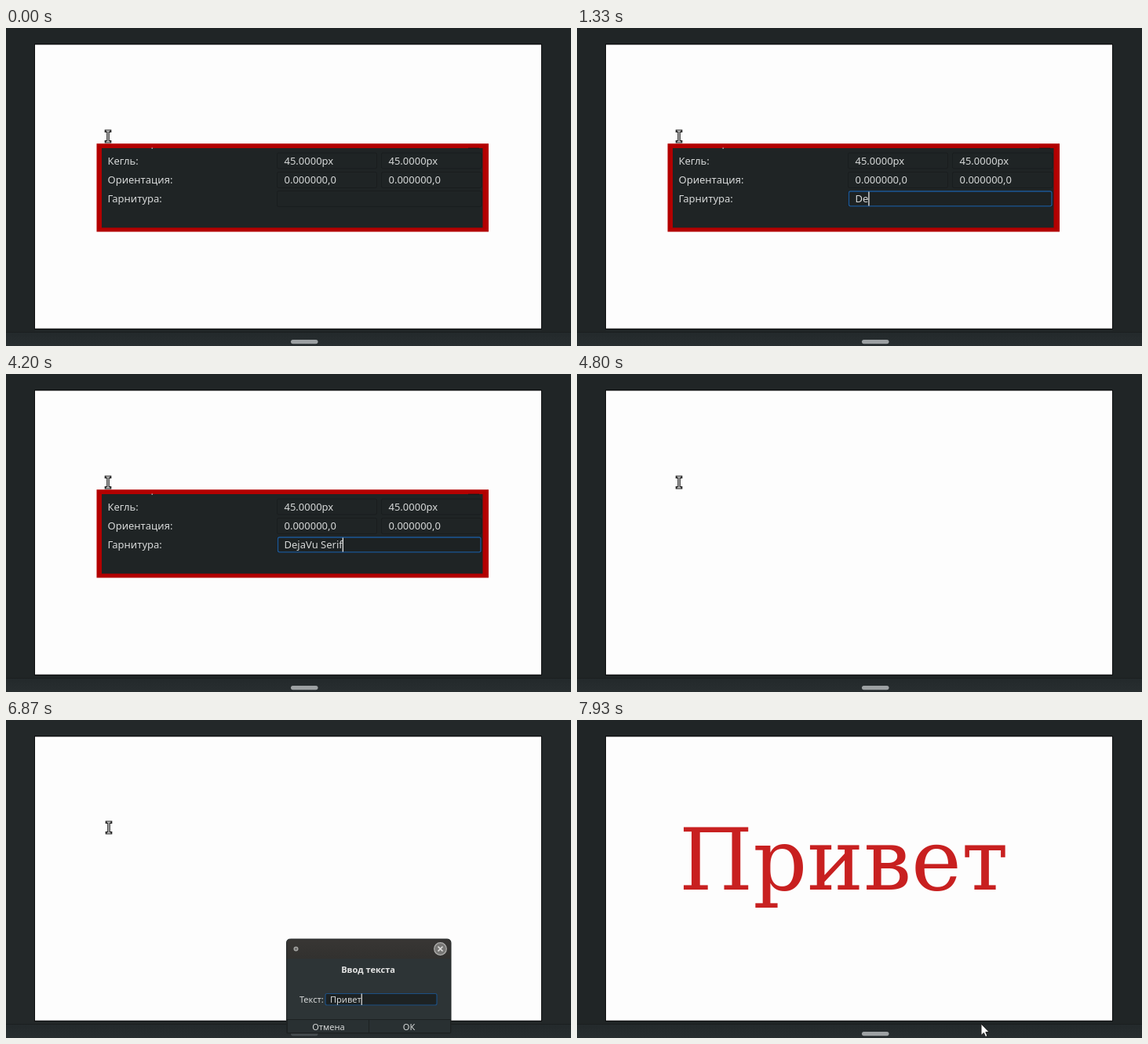
Recreate the animation shown at these times as an HTML page. Size 720x405 px, loop 8 s.

```html
<!DOCTYPE html>
<html lang="ru">
<head>
<meta charset="utf-8">
<style>
html, body { margin: 0; height: 100%; overflow: hidden; background: #202526; }
svg { display: block; width: 720px; height: 405px; }
text { font: 13px "Noto Sans", "Open Sans", sans-serif; fill: #d6d8d8; white-space: pre; }
#dialog text { font-size: 11px; }
#dialog .title { font-weight: bold; fill: #e6e6e6; }
#dialog .mid { text-anchor: middle; }
#result { font: 108px "DejaVu Serif", serif; fill: #c82020; }
.field { fill: #1f2425; stroke: #191d1e; }
.caret { fill: #f4f4f4; }
</style>
</head>
<body>
<svg viewBox="0 0 720 405">
  <defs>
    <linearGradient id="bar" x2="0" y2="1">
      <stop stop-color="#23292b"/><stop offset="1" stop-color="#282e30"/>
    </linearGradient>
    <linearGradient id="head" x2="0" y2="1">
      <stop stop-color="#383634"/><stop offset="1" stop-color="#32312f"/>
    </linearGradient>
  </defs>
  <rect id="back" width="720" height="405"/>
  <rect y="387" width="720" height="18" fill="url(#bar)"/>
  <rect y="387" width="720" height="1" fill="#1b1f20"/>
  <rect id="handle" x="363" y="397" width="34.5" height="5.2" rx="2.6"/>
  <rect x="36" y="20" width="647" height="364" fill="#0d0f10"/>
  <rect x="37" y="21.3" width="645" height="361.4" fill="#fdfdfd"/>

  <text id="result" x="130" y="215.5">Привет</text>

  <g id="panel">
    <rect x="115.5" y="147.2" width="499.5" height="112.3" fill="#b30000"/>
    <rect x="122" y="153" width="485.5" height="101.3" fill="#1f2425"/>
    <rect x="185.5" y="152.5" width="1.5" height="1.2" fill="#ccc"/>
    <rect x="589" y="152.7" width="14" height="1" fill="#151819"/>
    <rect class="field" x="345.5" y="159" width="127" height="20" rx="2"/>
    <rect class="field" x="478.5" y="159" width="127.5" height="20" rx="2"/>
    <rect class="field" x="345.5" y="183.5" width="127" height="20" rx="2"/>
    <rect class="field" x="478.5" y="183.5" width="127.5" height="20" rx="2"/>
    <rect class="field" x="345.5" y="207.5" width="260.5" height="20" rx="2"/>
    <rect id="focus" x="346.5" y="208" width="258.5" height="18.8" rx="2" fill="#1d2223" stroke="#1c5896" stroke-width="1.3"/>
    <text x="129.5" y="174">Кегль:</text>
    <text x="129.5" y="198">Ориентация:</text>
    <text x="129.5" y="222">Гарнитура:</text>
    <text x="354.5" y="174">45.0000px</text>
    <text x="487.5" y="174">45.0000px</text>
    <text x="354.5" y="198">0.000000,0</text>
    <text x="487.5" y="198">0.000000,0</text>
    <text id="font" x="354.5" y="222"></text>
    <rect id="fontCaret" class="caret" y="208.5" width="1.2" height="18"/>
  </g>

  <g id="dialog">
    <path d="M357.5 398V284q0-5 5-5h199.500q5 0 5 5V398q0 1-1 1H358.500q-1 0-1-1z" fill="#2d3436" stroke="#202425"/>
    <path d="M358 304V284q0-4.500 4.500-4.500h199q5 0 5 4.500V304z" fill="url(#head)"/>
    <circle cx="369.500" cy="291.500" r="3" fill="#a0a09e"/>
    <circle cx="369.500" cy="291.500" r="1.200" fill="#555"/>
    <circle cx="553.500" cy="291.500" r="7.800" fill="#777674" stroke="#b0afad" stroke-width="1.200"/>
    <path d="M550.500 288.500l6 6m0-6l-6 6" stroke="#dedddb" stroke-width="1.700"/>
    <text class="title mid" x="461.5" y="322">Ввод текста</text>
    <text x="374" y="360">Текст:</text>
    <rect x="407" y="348.5" width="142" height="14.500" rx="2" fill="#1d2223" stroke="#1c4f82" stroke-width="1.200"/>
    <text id="word" x="413" y="360"></text>
    <rect id="wordCaret" class="caret" y="348.5" width="1.100" height="14.500"/>
    <rect x="358.500" y="381.500" width="208" height="17" fill="#293032" stroke="#1d2122"/>
    <path d="M462.500 382v16" stroke="#1d2122"/>
    <text class="mid" x="411" y="394.500">Отмена</text>
    <text class="mid" x="513.500" y="394.500">ОК</text>
  </g>

  <g id="beam" fill="none">
    <path d="M-2.500-6.800h5M0-6.800v13.600M-2.500 6.800h5" stroke="#222" stroke-width="3.600" stroke-linecap="square"/>
    <path d="M-2.500-6.800h5M0-6.800v13.600M-2.500 6.800h5" stroke="#d4d4d4" stroke-width="1.300"/>
  </g>
  <path id="arrow" d="M0 0V14.500L3.400 11.500L5.600 16.500L8 15.400L5.800 10.500H10.200Z" fill="#fff" stroke="#222"/>
</svg>
<script>
const LOOP = 8000;
const $ = id => document.getElementById(id);
const show = (id, on) => $(id).setAttribute("display", on ? "inline" : "none");
const place = (id, [x, y]) => $(id).setAttribute("transform", `translate(${x} ${y})`);

// Each entry is the moment its letter is typed.
const fontKeys = [1200, 1330, 1600, 1800, 2400, 2600, 2870, 3270, 3330, 3470, 3600, 3700];
const wordKeys = [5600, 5700, 5800, 5900, 6000, 6130];

function type(id, string, keys, t) {
  const el = $(id), caret = $(id + "Caret");
  const count = keys.filter(k => k <= t).length;
  el.textContent = string.slice(0, count);
  const width = count ? el.getComputedTextLength() : 0;
  caret.setAttribute("x", +el.getAttribute("x") + width);
}

const path = [
  [0, 130, 138], [5200, 130, 138], [5270, 131, 137], [6870, 131, 137],
  [7370, 495.5, 366.5], [7420, 495.5, 366.5], [7600, 515, 387], [LOOP, 515, 387]
];

function pointer(t) {
  const i = path.findIndex(p => p[0] > t);
  const [t0, x0, y0] = path[i - 1], [t1, x1, y1] = path[i];
  const u = (t - t0) / (t1 - t0), e = u * u * (3 - 2 * u);
  return [x0 + (x1 - x0) * e, y0 + (y1 - y0) * e];
}

function draw(t) {
  const modal = t >= 5270 && t < 7730, focused = t >= 600;
  $("back").setAttribute("fill", modal ? "#232829" : "#202526");
  $("handle").setAttribute("fill", modal ? "#474e51" : "#9da1a3");
  show("panel", t < 4790);
  show("focus", focused);
  show("fontCaret", focused);
  show("dialog", modal);
  show("result", t >= 7730);
  type("font", "DejaVu Serif", fontKeys, t);
  type("word", "Привет", wordKeys, t);
  const at = pointer(t), onDialog = at[0] > 357 && at[1] > 279;
  show("beam", !onDialog);
  show("arrow", onDialog);
  place("beam", at);
  place("arrow", at);
}

function tick() {
  draw(performance.now() % LOOP);
  requestAnimationFrame(tick);
}
tick();
</script>
</body>
</html>
```
